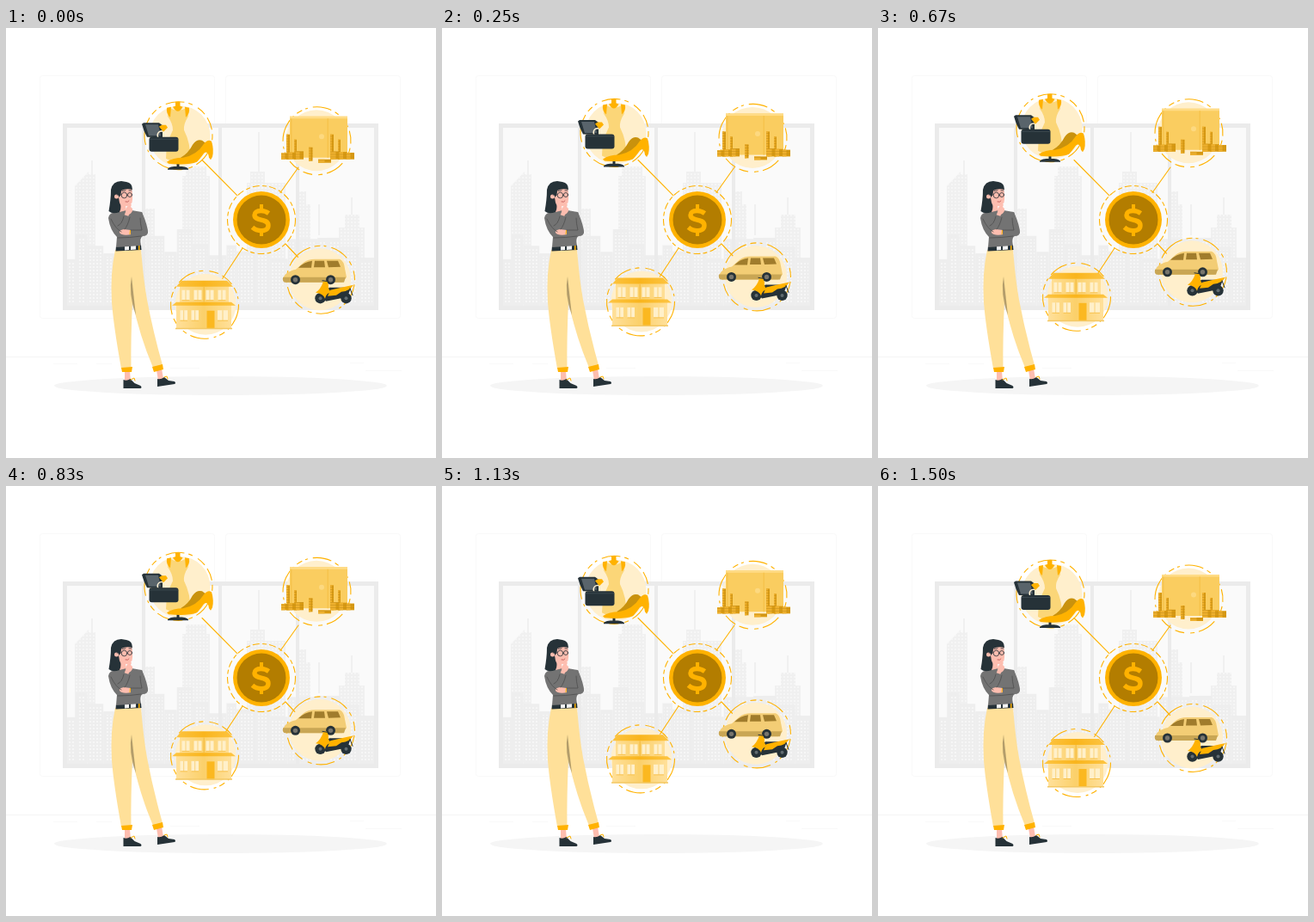
An HTML page that plays this animation: 500x500 px, repeating every 1.54 s.

```html
<!DOCTYPE html>
<html lang="en">
<head>
<meta charset="utf-8">
<title>Wealth</title>
<style>
html, body { margin: 0; width: 100%; height: 100%; overflow: hidden; background: #fff; }
svg { display: block; width: 100%; height: 100%; }
.ring { fill: none; stroke: #ffb200; stroke-width: 1.1; stroke-dasharray: 15 5 7 4 3 6 22 5 5 7 11 5; }
.disc { fill: #ffefcc; }
.gold { fill: #ffb200; }
.brown { fill: #b37d00; }
.pale { fill: #ffe099; }
.ink { fill: #263238; }
.skin { fill: #fdbdaf; }
.grey { fill: #737373; }
.line { fill: none; stroke-linecap: round; stroke-linejoin: round; }
</style>
</head>
<body>
<svg viewBox="0 0 500 500">
  <defs>
    <pattern id="lights" width="4" height="4" patternUnits="userSpaceOnUse">
      <path d="M1 1h2v2H1z" fill="#f6f6f6"/>
    </pattern>
    <linearGradient id="wall"><stop stop-color="#ffe09a"/><stop offset=".5" stop-color="#fbd06a"/><stop offset="1" stop-color="#ffe09a"/></linearGradient>
    <linearGradient id="roof"><stop stop-color="#fdc544"/><stop offset=".5" stop-color="#f9b51d"/><stop offset="1" stop-color="#fdc544"/></linearGradient>
  </defs>

  <g fill="none" stroke="#f9f9f9">
    <rect x="39.5" y="55.5" width="203" height="282" rx="3"/>
    <rect x="255.5" y="55.5" width="203" height="282" rx="3"/>
    <path d="M0 382.500H500" stroke="#f5f5f5"/>
    <path d="M400 389.500h16M418 398.500h42M55 390.500h28M105 390.500h18M191 395.500h34"/>
  </g>
  <ellipse cx="249.500" cy="416" rx="193.500" ry="11" fill="#f5f5f5"/>

  <path d="M66 111H433V328H66z" fill="#ebebeb"/>
  <path d="M71 116H428V323H71z" fill="#fafafa"/>
  <g fill="#f0f0f0">
    <path id="towers" d="M80 323V184L96 167V170H104V323zM162 323V210H173V323zM205 323V172H209V161H233V172H237V323zM280 323V180H284V167H301V180H325V323zM341 323V190H349V205H354V323zM387 323V232H394V217H411V232H417V323z"/>
    <path d="M99 154h2v16h-2zM293 121h2v50h-2zM363 205h2v36h-2zM401 197h2v22h-2z"/>
    <use href="#towers" fill="url(#lights)" style="fill:url(#lights)"/>
    <g id="blocks"></g>
  </g>
  <path d="M158 116h4v207h-4zM247 116h4v207h-4zM337 116h4v207h-4z" fill="#ebebeb"/>

  <path class="line" stroke="#ffb200" stroke-width="1.100" d="M269 194.800L228 153.500M319 191.500L340 162M275 256L250 294M325 251L341 268"/>
  <circle class="ring" cx="297" cy="223" r="39.500" style="stroke-dasharray:8 3.500 5 3"/>
  <circle class="gold" cx="297" cy="223" r="33"/>
  <circle class="brown" cx="297" cy="223" r="28.500"/>
  <path class="line" stroke="#ffb200" stroke-width="5.400" style="stroke-linecap:butt"
    d="M305.500 215.500C302 213 300 212.500 296.500 212.500C291 212.500 289 215 289 217.500C289 225.500 305 220.500 305 229.500C305 234.500 300.500 235.700 297 235.700C292.500 235.700 289.500 234.500 286.500 231.800"/>
  <path class="gold" d="M295 205h4v7h-4zM295 236h4v6h-4z"/>

  <g id="floating">
    <g>
      <circle class="disc" cx="202" cy="126" r="35.500"/>
      <circle class="ring" cx="200.500" cy="125.500" r="39.500" transform="rotate(190 200.500 125.500)"/>
      <path class="ink" d="M198.500 157h3v5h-3zM188 164q2-3 12-3t12 3v1h-24z"/>
      <path fill="#fbd678" d="M190 93Q200 99 210 93L212 103Q206 112 207 119Q215 135 214 152Q200 160 186 152Q186 134 194 119Q194 111 188 103z"/>
      <path class="gold" d="M197 86h5.500v5l3 1q-5.500 10-11.500 0l3-1zM187 93l5-1-1 12q-5-4-4-11zM208 92l5 1q1 7-4 11z"/>
      <path fill="#c9920d" d="M203 151Q212 146 217 136Q222 129 228 131L232 134Q224 152 206 153z"/>
      <path class="gold" d="M187 156Q194 151 206 151Q222 148 230 135Q235 129 239 132Q242 142 240 150L238 153.500L236 151Q235 142 230 146Q225 153 222 156Q212 160 189 158z"/>
      <path class="ink" d="M158 112l2-1.500h18l4 3v14l-18-.5q-4-7-6-15z"/>
      <path fill="#59646b" d="M162 112.500h15l3 13h-14z"/>
      <circle class="line" cx="181" cy="125" r="4.800" stroke="#fff2d4" stroke-width="1.600"/>
      <path class="gold" d="M178 115l3-2h5l2 3-5 5z"/>
      <rect class="ink" x="166.500" y="127" width="34" height="17" rx="3"/>
      <path d="M167 129.500h33" stroke="#3b484f"/>
    </g>

    <g>
      <circle class="disc" cx="361" cy="131" r="35.500"/>
      <circle class="ring" cx="361.500" cy="131.500" r="39.500" transform="rotate(205 361.500 131.500)"/>
      <path fill="#facd60" d="M330 103h67v48h-67z"/>
      <path fill="#ffdc87" d="M330 103h67v2.500h-67z"/>
      <path fill="#f6c34d" d="M331 105.500h1.500V151H331zM373.500 105.500h1.500V151h-1.500z"/>
      <circle cx="367" cy="126.500" r="3" fill="#fdd980"/>
      <g id="coins"></g>
    </g>

    <g>
      <circle class="disc" cx="365" cy="292.500" r="36"/>
      <circle class="ring" cx="366" cy="293" r="39.500" transform="rotate(230 366 293)"/>
      <path fill="#f3cd75" d="M322 293Q323 284 337 281L346 273Q351 269 359 269L388 269Q393 271 394 280L396 290L391 296H325z"/>
      <path fill="#c9a654" d="M322 290H395L393 296H325Q321 296 322 290z"/>
      <path fill="#a07c2c" d="M340 279Q347 272 356 271L355 279zM359 271h11l1 7.500h-13zM373 271h13l3 7-14 .5z"/>
      <g class="ink"><circle cx="336.500" cy="293" r="5.500"/><circle cx="377.500" cy="293" r="5.500"/></g>
      <g fill="#77756d"><circle cx="336.500" cy="293" r="2.700"/><circle cx="377.500" cy="293" r="2.700"/></g>
      <g class="ink"><circle cx="365.500" cy="314.500" r="6.200"/><circle cx="395.500" cy="314.500" r="6.200"/>
        <path d="M367 311L376 302L401 302L397 313L372 318z"/></g>
      <path class="gold" d="M360 308Q366 304 369 295L373 294L375 299Q374 304 378 307Q372 309 371 315Q369 309 360 308zM377 305L390 302L404 299Q400 306 390 307L384 311L374 312z"/>
      <path class="line" stroke="#263238" d="M368 294l6 1M400 303l3 8"/>
      <g fill="#606b70"><circle cx="365.500" cy="314.500" r="2"/><circle cx="395.500" cy="314.500" r="2"/></g>
    </g>

    <g>
      <circle class="disc" cx="232" cy="321.500" r="35.500"/>
      <circle class="ring" cx="231" cy="322" r="39.500" transform="rotate(25 231 322)"/>
      <path fill="url(#wall)" d="M202 299h57v21h-57zM198 322h64v28h-64z"/>
      <path fill="url(#roof)" d="M198 301L204 294H257L264 301zM193 323L198 319H262L267 323z"/>
      <path fill="#f5c04a" d="M229.500 301h1.500v18h-1.500z"/>
      <path fill="#fbb820" d="M233.500 329h9v21h-9z"/>
      <g id="windows"></g>
      <path fill="#f3c865" d="M197 349h66v1.500h-66z"/>
    </g>
  </g>

  <g>
    <path class="skin" d="M138 399h6l1 12h-7zM175 398l6-2 2 12-6 2z"/>
    <path class="ink" d="M136.500 409q4 2 8-1l5 5 7 3q2 2 0 3h-20zM176 408q4 1 8-2l5 4 7 1q2 2 0 3l-20 3z"/>
    <path class="line" stroke="#ffb200" d="M145 409l4-2 1 3M184 406l3-1 1 3"/>
    <path class="pale" d="M127 258H157Q160 294 164 316Q171 353 182 392L171 395Q155 357 147 318Q145 362 145.500 395L134 396Q125 346 123 319Q121 285 127 258z"/>
    <path fill="#b39d6b" d="M146 289Q142 309 151 334Q149 316 146 289z"/>
    <path class="gold" d="M134 395l13-1-1 6h-11zM170 394l12-3 1 6-11 3z"/>
    <path class="ink" d="M128 254l29-2 .5 6-30 1.500z"/>
    <path d="M138 253.500l5-.5v5l-5 .5zM145 253l6-.5v5l-6 .5z" fill="#f5f5f5"/>
    <path class="gold" d="M154 252h1.500v6H154z"/>
    <path class="grey" d="M129 214Q120 214 119 221Q121 235 129 243L128 255L157 253Q155 244 159 242Q165 242 165 237L158 214L140 211z"/>
    <path class="skin" d="M130 187Q139 185 146 186Q148 196 146.500 203Q143 208 139 207L140 212L132 214z"/>
    <path class="ink" d="M134 178Q124 178 122 188Q122 199 119.500 213Q124 217 132 214Q135 208 132 203L131 197Q134 195 134 189Q140 186 147 188Q147 180 140 179z"/>
    <circle class="skin" cx="128.500" cy="196" r="2.500"/>
    <g class="line" stroke="#263238" stroke-width=".8">
      <circle cx="137.500" cy="194.500" r="3.300"/><circle cx="144" cy="194" r="2.500"/>
      <path d="M129 194l5 0M135 189.500l4-.5M143 189l3 0"/>
    </g>
    <path class="line" stroke="#b84e4d" stroke-width=".8" d="M139 202q3 1 4-1"/>
    <path class="skin" d="M139 214Q139 208 144 205Q147 204 145 208L147 210Q148 214 143 217L141 222L137 219z"/>
    <path class="grey" d="M137 217L143 219Q142 233 137 238Q130 236 129 228z"/>
    <path class="skin" d="M145 235L137 234Q131 235 132 238Q135 242 146 240z"/>
    <path class="grey" d="M145 234L157 235L158 214Q165 230 165 238Q163 243 145 241z"/>
    <path class="line" stroke="#505050" stroke-width=".8" d="M137 219q-2 9-7 11M144 220q-2 9-6 14M145 235l13 0q-2-8-2-14M122 222q5 11 12 15M130 244q14 0 27-2"/>
    <path d="M144.500 235l-.5 5" stroke="#ffb200"/>
  </g>
</svg>
<script>
const $ = id => document.getElementById(id);
const rect = (x, y, w, h, fill) => `<rect x="${x}" y="${y}" width="${w}" height="${h}" fill="${fill}"/>`;

let seed = 7;
const random = () => (seed = seed * 16807 % 2147483647) / 2147483647;

// Low city blocks along the bottom of the window
let blocks = '';
for (let x = 71; x < 428;) {
  const w = Math.min(10 + random() * 12, 428 - x), y = 232 + random() * 40;
  blocks += rect(x, y, w, 323 - y, '#eee') + rect(x + 2, y + 4, Math.max(0, w - 4), 315 - y, 'url(#lights)');
  x += w;
}
$('blocks').innerHTML = blocks;

function stack(x, w, h, bottom = 153) {
  let coins = rect(x, bottom - h, w, h, '#d99a12') + rect(x, bottom - h, w / 2, h, '#eeb02e');
  for (let y = 3; y < h; y += 3) coins += rect(x, bottom - y, w, .5, '#c18b18');
  return coins;
}
// Two thin stacks behind a row of low, wide ones
function pile(left, tall) {
  let coins = '';
  for (let i = 0; i < 2; i++) coins += stack(tall + 9 * i, 4 - i, 29 - 6 * i);
  for (let i = 0; i < 3; i++) coins += stack(left + 8.5 * i, 9, 7 + random() * 4);
  return coins;
}
$('coins').innerHTML = pile(320, 326) + pile(379, 377) + stack(352, 4.5, 16, 155) + stack(363, 15, 4, 157);

const pane = (x, y, w) => rect(x, y, w, 12, '#fff0ca') +
  rect(x + w / 2 - .4, y, .8, 12, '#f8cb68') + rect(x, y + 11.5, w, 1, '#f8c14a');
let panes = '';
for (let i = 0; i < 4; i++) panes += pane(204.5 + 14 * i, 305, 9);
for (let i = 0; i < 2; i++) panes += pane(202.5 + 13 * i, 328.5, 8.5);
$('windows').innerHTML = panes + pane(246, 328.5, 12);

const LOOP = 1540, PEAK = 730, HALF = 750, RISE = 10;
const start = performance.now();
function draw(now) {
  const t = Math.max(0, now - start) % LOOP;
  const y = -RISE * Math.max(0, 1 - Math.abs(t - PEAK) / HALF);
  $('floating').setAttribute('transform', `translate(0 ${y})`);
  requestAnimationFrame(draw);
}
draw(start);
</script>
</body>
</html>
```
